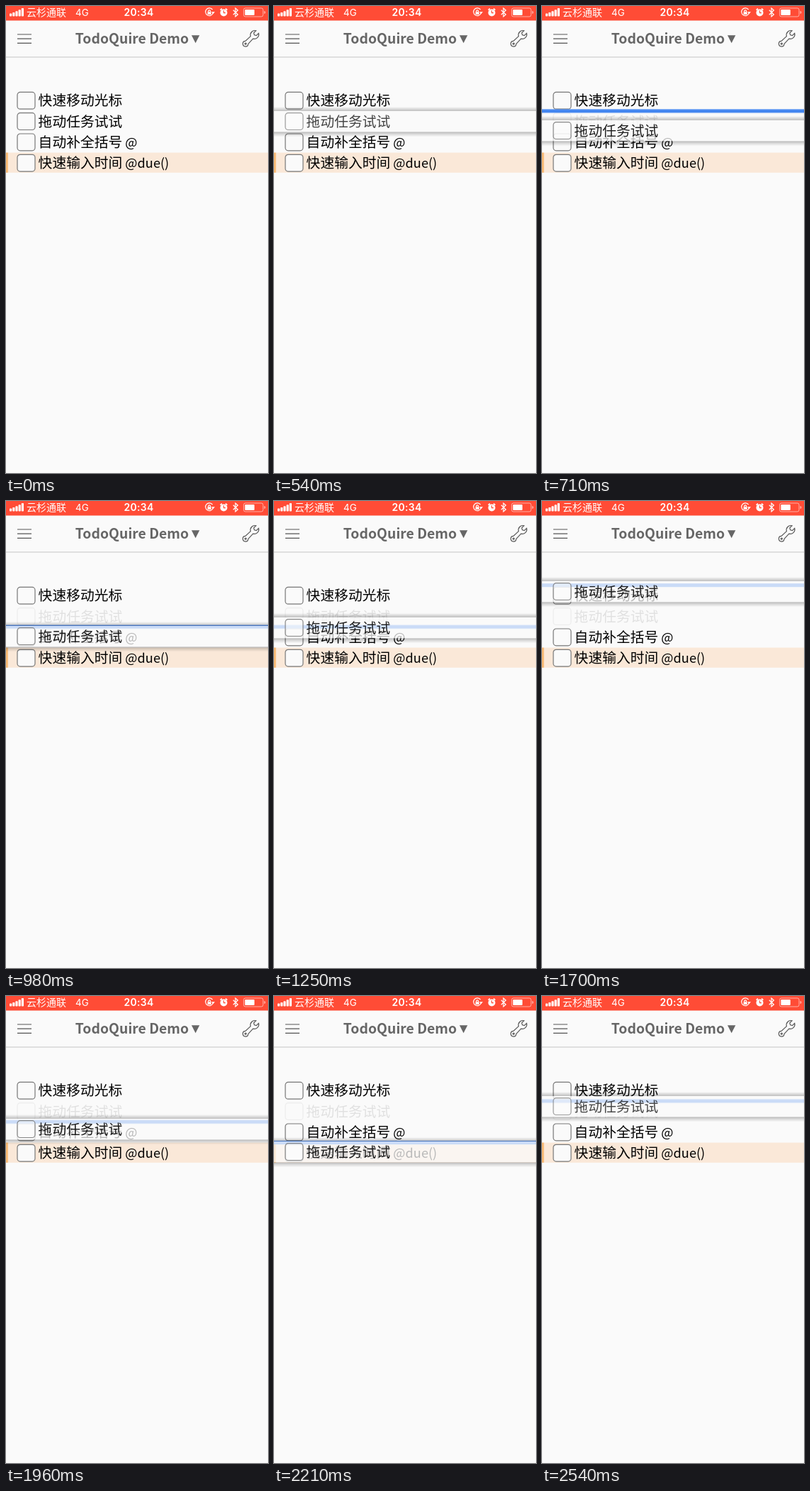
Animation, 370 px wide and 658 px high, one loop 2.64 s. Source, as an HTML page:

```html
<!DOCTYPE html>
<html lang="zh-CN">
<head>
<meta charset="utf-8">
<title>Task list drag</title>
<style>
  html, body { margin: 0; height: 100%; overflow: hidden; background: #fafafa; }
  svg { display: block; width: 100vw; height: 100vh; }
  text { font-family: "Noto Sans CJK SC", "Noto Sans CJK", "Noto Sans", sans-serif; }
  .row text { font-size: 19.8px; }
  .row tspan { font-size: 18.2px; }
  .box { fill: #fafafa; stroke: #777; stroke-width: 1.2; }
  .status { fill: #fff; font-size: 14px; }
  .line { fill: none; stroke: #fff; stroke-width: 1.2; }
  .tool { fill: none; stroke: #555; stroke-width: 1.2; }

  .card, .lift, .ink, .ghost, .mark { animation: 2640ms step-end infinite; }
  .card { animation-name: drag; }
  .lift { animation-name: lift; }
  .ink { animation-name: ink; }
  .ghost { animation-name: ghost; }
  .mark { animation-name: mark; }

  /* vertical offset of the held row from its home slot */
  @keyframes drag {
    0% { transform: translateY(0); }
    23.48% { transform: translateY(4px); }
    26.89% { transform: translateY(13px); }
    30.30% { transform: translateY(22px); }
    33.71% { transform: translateY(26px); }
    37.12% { transform: translateY(28px); }
    47.34% { transform: translateY(16px); }
    50.75% { transform: translateY(-5px); }
    54.16% { transform: translateY(-25px); }
    57.57% { transform: translateY(-30px); }
    60.98% { transform: translateY(-33px); }
    64.39% { transform: translateY(-35px); }
    67.80% { transform: translateY(-27px); }
    71.21% { transform: translateY(0); }
    74.24% { transform: translateY(25px); }
    77.27% { transform: translateY(41px); }
    80.30% { transform: translateY(51px); }
    83.71% { transform: translateY(57px); }
    87.12% { transform: translateY(58px); }
    96.21%, 100% { transform: translateY(-7px); }
  }
  @keyframes lift {
    0% { opacity: 0; }
    13.63% { opacity: .35; }
    17.04% { opacity: .7; }
    20.45%, 100% { opacity: 1; }
  }
  @keyframes ink {
    0% { opacity: .72; }
    23.48% { opacity: .88; }
    96.21%, 100% { opacity: .72; }
  }
  @keyframes ghost {
    0% { opacity: 1; }
    13.63% { opacity: .65; }
    17.04% { opacity: .3; }
    20.45%, 100% { opacity: .1; }
  }
  /* drop line snaps to the nearest row edge */
  @keyframes mark {
    0% { opacity: 0; transform: translateY(29.3px); }
    23.48% { opacity: 1; transform: translateY(29.3px); }
    30.30% { opacity: 1; transform: translateY(58.6px); }
    50.75% { opacity: 1; transform: translateY(29.3px); }
    54.16% { opacity: 1; transform: translateY(0); }
    71.21% { opacity: 1; transform: translateY(29.3px); }
    74.24% { opacity: 1; transform: translateY(58.6px); }
    80.30% { opacity: 1; transform: translateY(87.9px); }
    96.21%, 100% { opacity: 1; transform: translateY(29.3px); }
  }
</style>
</head>
<body>
<svg viewBox="0 0 370 658" preserveAspectRatio="none">
  <defs>
    <rect id="check" class="box" x="16" y="2.7" width="25" height="23.8" rx="4"/>
    <linearGradient id="above" x2="0" y2="1">
      <stop offset="0" stop-opacity="0"/>
      <stop offset="1" stop-opacity=".24"/>
    </linearGradient>
    <linearGradient id="below" x2="0" y2="1">
      <stop offset="0" stop-opacity=".28"/>
      <stop offset=".4" stop-opacity=".14"/>
      <stop offset="1" stop-opacity="0"/>
    </linearGradient>
  </defs>

  <rect width="370" height="658" fill="#fafafa"/>

  <!-- status bar -->
  <rect width="370" height="20.5" fill="#ff4c36"/>
  <g fill="#fff">
    <rect x="5" y="10.5" width="3.2" height="4" rx=".8"/>
    <rect x="9.2" y="9" width="3.2" height="5.5" rx=".8"/>
    <rect x="13.4" y="7.2" width="3.2" height="7.3" rx=".8"/>
    <rect x="17.6" y="5.2" width="3.2" height="9.3" rx=".8"/>
    <rect x="21.8" y="3" width="3.2" height="11.5" rx=".8"/>
  </g>
  <text class="status" x="29" y="14.3">云杉通联</text>
  <text class="status" x="98" y="14" style="font: 13.5px Inter, sans-serif">4G</text>
  <text class="status" x="187.5" y="14" text-anchor="middle" style="font: 600 14px Inter, sans-serif; letter-spacing: .3px">20:34</text>
  <g class="line">
    <path d="M291.6 5.2A5.4 5.4 0 1 0 292.4 9.6"/>
    <path d="M285.6 8.5V7.4a1.5 1.5 0 0 1 3 0V8.5"/>
    <path d="M302.6 5.6L305 3.6M312.4 5.6L310 3.6" stroke-width="1.8"/>
    <path d="M320.8 5.8L327.4 12L324 15V3L327.4 6L320.8 12.2"/>
    <rect x="335.6" y="3" width="27.4" height="12" rx="2.4" stroke-width="1" opacity=".55"/>
  </g>
  <g fill="#fff">
    <path d="M284.6 8.3h5v3.6h-5zM290 8.2h5l-2.5 3z"/>
    <circle cx="307.5" cy="9.4" r="5"/>
    <rect x="337.4" y="5" width="13.4" height="8" rx="1"/>
    <path d="M364.5 7a2 2 0 0 1 0 4z" opacity=".55"/>
  </g>
  <path d="M307.5 6.2V9.6H310" fill="none" stroke="#ff4c36" stroke-width="1.1"/>

  <!-- title bar -->
  <rect y="71.5" width="370" height="1" fill="#c6c6c6"/>
  <path class="tool" d="M16 40H36M16 46.2H36M16 52.4H36"/>
  <text x="178" y="53.3" text-anchor="middle" font-size="19.4" font-weight="700" fill="#666">TodoQuire Demo</text>
  <path d="M262 41.3H273.3L267.65 52.3Z" fill="#666"/>
  <g class="tool" transform="translate(345 46.5) rotate(-45)">
    <path d="M14 -2.6H9.5L8 0L9.5 2.6H14A6.3 6.3 0 0 1 3 2.4L-7 2.8A3.8 3.8 0 1 1 -7 -2.8L3 -2.4A6.3 6.3 0 0 1 14 -2.6Z"/>
    <circle cx="-9.4" r="1"/>
  </g>

  <!-- tasks -->
  <g class="row" transform="translate(0 118.7)">
    <use href="#check"/>
    <text x="45.6" y="21.5">快速移动光标</text>
  </g>
  <g class="row" transform="translate(0 148)">
    <g class="ghost">
      <use href="#check"/>
      <text x="45.6" y="21.5">拖动任务试试</text>
    </g>
  </g>
  <g class="row" transform="translate(0 177.3)">
    <use href="#check"/>
    <text x="45.6" y="21.5">自动补全括号<tspan> @</tspan></text>
  </g>
  <g class="row" transform="translate(0 206.6)">
    <rect width="370" height="28.2" fill="#fae8d8"/>
    <rect width="2.8" height="28.2" fill="#f9bb75"/>
    <use href="#check"/>
    <text x="45.6" y="21.5">快速输入时间<tspan> @due()</tspan></text>
  </g>

  <rect class="mark" y="116.2" width="370" height="5" fill="#4285f0"/>

  <!-- held row -->
  <g class="row" transform="translate(0 148)">
    <g class="card">
      <g class="lift">
        <rect y="-6" width="370" height="6" fill="url(#above)"/>
        <rect y="29.3" width="370" height="7" fill="url(#below)"/>
        <rect width="370" height="29.3" fill="#fafafa" fill-opacity=".74"/>
        <g class="ink">
          <use href="#check" fill-opacity=".6"/>
          <text x="45.6" y="21.5">拖动任务试试</text>
        </g>
      </g>
    </g>
  </g>
</svg>
</body>
</html>
```
